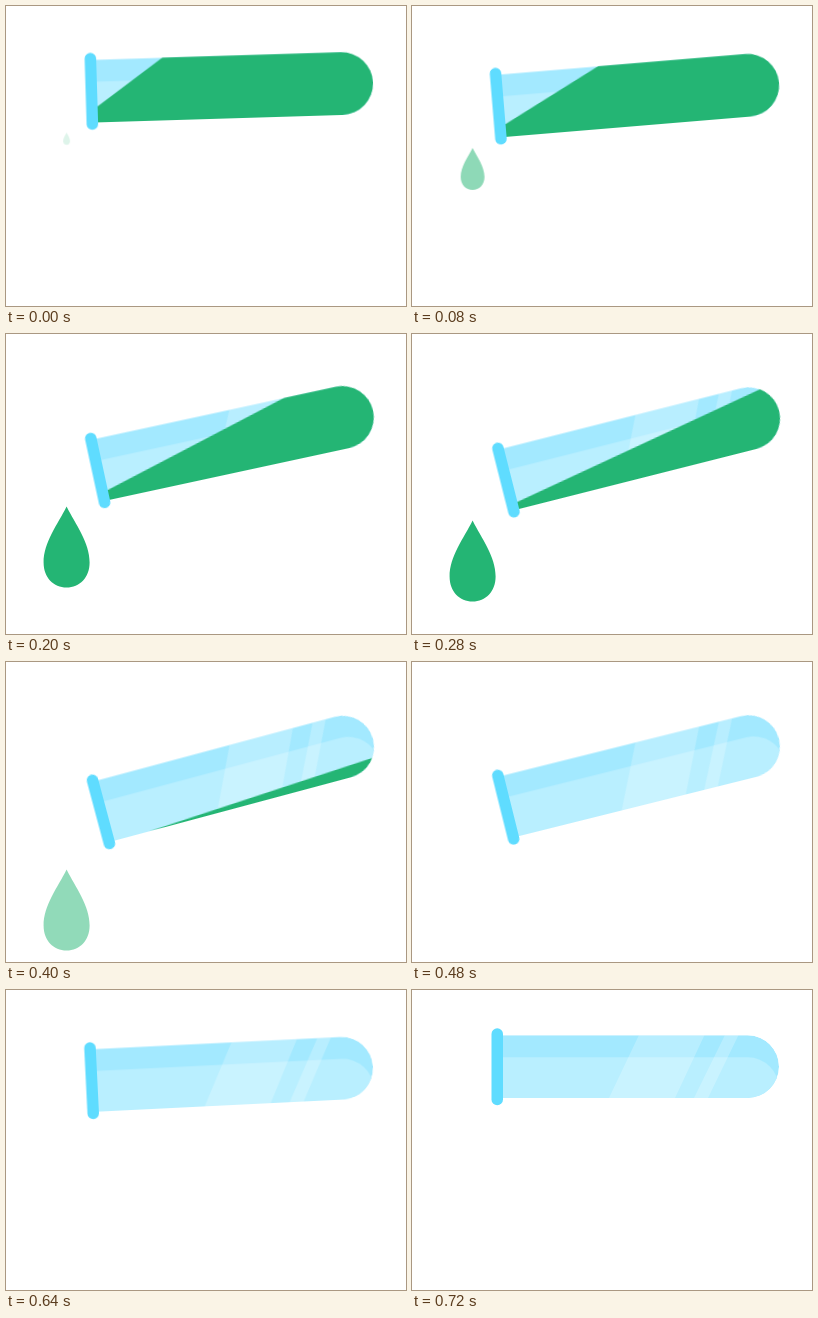
Write an HTML page that moves like this. It is 400 by 300 pixels and loops after 800 ms.

```html
<!DOCTYPE html>
<html lang="en">
<head>
<meta charset="utf-8">
<title>Pouring test tube</title>
<style>
  html, body { margin: 0; width: 100%; height: 100%; overflow: hidden; background: #fff; }
  svg { display: block; width: 400px; height: 300px; }
  #tube { transform-origin: 368px 76.4px; }
</style>
</head>
<body>
<svg viewBox="0 0 400 300">
  <defs>
    <path id="glass" d="M86 45.3H335.7A31.3 31.3 0 0 1 335.7 107.9H86Z"/>
    <clipPath id="inside"><use href="#glass"/></clipPath>
  </defs>
  <g id="tube">
    <g clip-path="url(#inside)">
      <use href="#glass" fill="#a3e9ff"/>
      <use href="#glass" y="22" fill="#b9efff"/>
      <path d="M227 45H292.5L263 108H197ZM313 45H326.5L296 108H282Z" fill="#fff" fill-opacity=".23"/>
      <polygon id="liquid" fill="#24b574"/>
    </g>
    <rect x="79.5" y="38.2" width="11.5" height="77" rx="5.75" fill="#5fdcff"/>
  </g>
  <path id="drop" fill="#24b574" d="M0 0C9 18 23 36 23 56C23 71 13 81 0 81S-23 71-23 56C-23 36-9 18 0 0Z"/>
</svg>
<script>
  const LOOP = 800, STEP = 40;
  const [tube, liquid, drop] = ['tube', 'liquid', 'drop'].map(id => document.getElementById(id));
  const clamp = x => Math.max(0, Math.min(1, x));

  // Paused timelines, moved along in whole steps by draw()
  function timeline(el, keys) {
    const anim = el.animate(keys, { duration: LOOP, fill: 'both' });
    anim.pause();
    return anim;
  }

  const swing = timeline(tube, [
    { offset: 0, transform: 'rotate(-1.74deg)', easing: 'cubic-bezier(.32, .1, .25, 1)' },
    { offset: .5, transform: 'rotate(-15deg)', easing: 'cubic-bezier(.62, 0, .62, 1)' },
    { offset: .9, transform: 'rotate(0deg)' },
    { offset: 1, transform: 'rotate(0deg)' }
  ]);

  const fall = timeline(drop, [[0, 127], [.15, 150], [.25, 173], [.5, 208], [1, 295]].map(
    ([offset, y]) => ({ offset, translate: `60.6px ${y - .4}px` })));

  function tiltNow() {
    const m = new DOMMatrix(getComputedStyle(tube).transform);
    return Math.atan2(-m.b, m.a);
  }

  function draw(time) {
    const t = Math.floor((time % LOOP) / STEP) * STEP;
    swing.currentTime = fall.currentTime = t;

    // The surface flattens on screen while the tube turns under it
    const v = (t - 200) / 200;
    const surface = (27.6 - 6.2 * v - 3.2 * v ** 3) * Math.PI / 180;
    const left = 98 + 5 * v + 3 * v ** 2 + 4 * v ** 3;
    const right = left - 276 * Math.tan(surface - tiltNow());
    liquid.setAttribute('points', `91,${left} 367,${right} 367,120 91,120`);

    const size = clamp(.15 + .0046 * t);
    drop.style.scale = size;
    drop.style.opacity = Math.min(size, clamp((480 - t) / 160));
  }

  const start = performance.now();
  function tick() {
    draw(performance.now() - start);
    requestAnimationFrame(tick);
  }
  tick();
</script>
</body>
</html>
```
